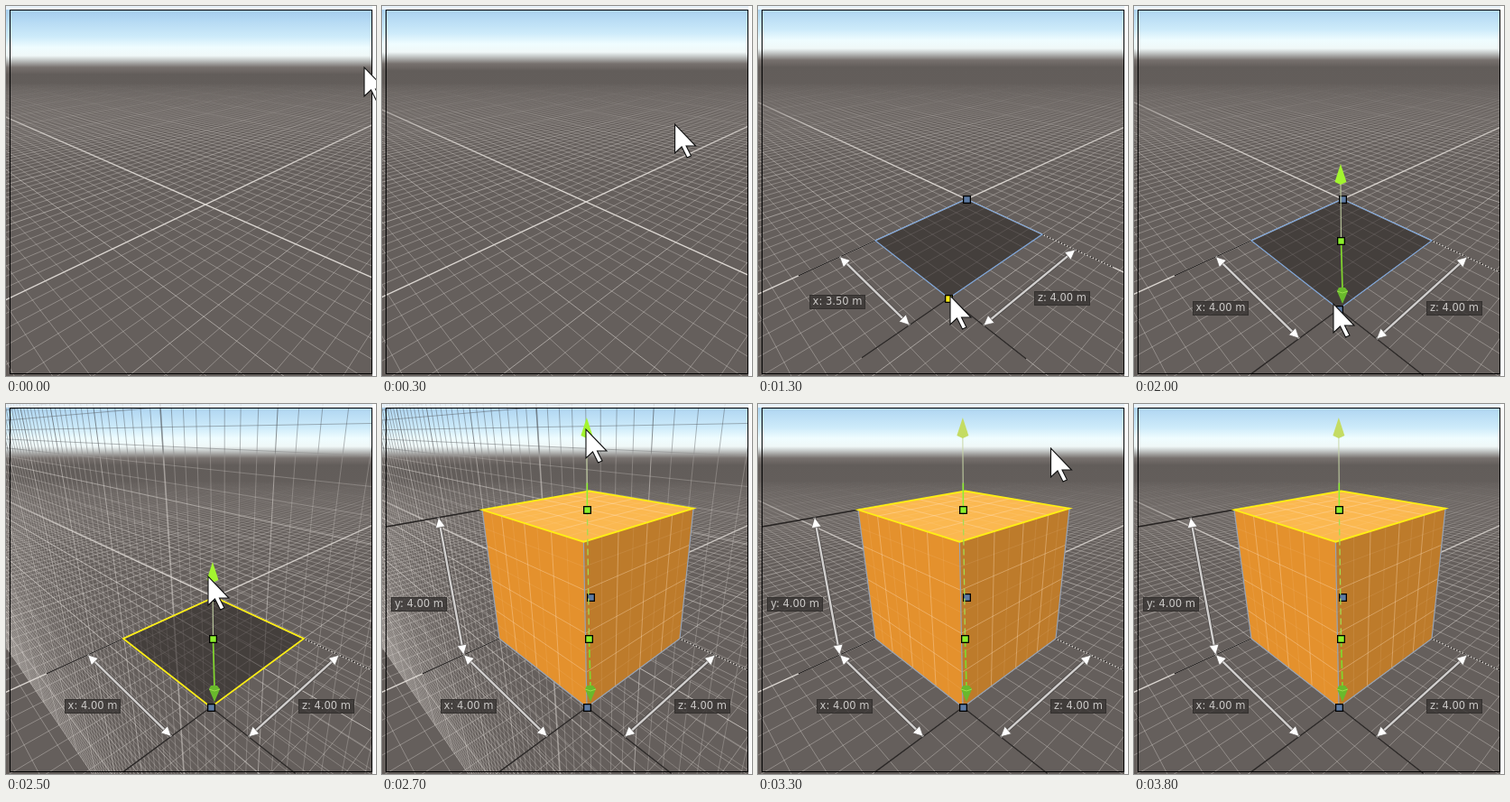
Animation, 410 px wide and 410 px high, one loop 3.9 s. Source, as an HTML page with a canvas:

```html
<!DOCTYPE html>
<html lang="en">
<head>
<meta charset="utf-8">
<title>Drawing a cube in a scene view</title>
<style>
html, body { margin: 0; width: 100%; height: 100%; overflow: hidden; background: #655f5c; }
canvas { display: block; }
</style>
</head>
<body>
<canvas id="stage" width="410" height="410"></canvas>
<script>
const ctx = document.getElementById('stage').getContext('2d');
const LOOP = 3900, STEP = 100, CELL = 0.5, SIZE = 4, GAP = 1.17;
const YELLOW = '#ffee14', GREEN = '#8cf02c', BLUE = '#5e7ba3';

// Projection columns (origin, x, y, z), axes scaled to 4 metres
const camStart = [[221, 220, 1], [37.2, -7.8, -.1956], [-28.3, -128.8, -.117], [-127.3, -6.6, -.207]];
const camEnd = [[231, 214, 1], [32.52, -6.37, -.2014], [-28.3, -128.8, -.117], [-126.13, -4.26, -.1933]];
let cam = camEnd;

// Pointer path: time, x, y
const path = [[0, 397, 68], [700, 228, 215], [1000, 228, 215], [1300, 213, 321], [1400, 213, 321],
  [1600, 227, 336], [2000, 221, 330], [2400, 224, 191], [2500, 224, 191], [2700, 226, 28],
  [2800, 226, 28], [2900, 237, 22], [3000, 237, 22], [3600, 412, 76], [LOOP, 412, 76]];

const lerp = (a, b, p) => a + (b - a) * p;

function pointer(t) {
  const i = Math.max(1, path.findIndex(k => k[0] >= t));
  const [a, b] = [path[i - 1], path[i]];
  const p = (t - a[0]) / (b[0] - a[0]);
  return [lerp(a[1], b[1], p), lerp(a[2], b[2], p)];
}

function project(x, y, z) {
  const [sx, sy, w] = [0, 1, 2].map(i =>
    cam[0][i] + (cam[1][i] * x + cam[2][i] * y + cam[3][i] * z) / SIZE);
  return [sx / w, sy / w];
}

function trace(points, close) {
  ctx.beginPath();
  points.forEach(p => ctx.lineTo(...p));
  if (close) ctx.closePath();
}

function line(points, color, width = 1, dash = []) {
  trace(points);
  ctx.setLineDash(dash);
  ctx.strokeStyle = color;
  ctx.lineWidth = width;
  ctx.stroke();
  ctx.setLineDash([]);
}

function shape(points, fill, stroke, width = 1) {
  trace(points, true);
  ctx.fillStyle = fill;
  ctx.fill();
  if (!stroke) return;
  ctx.strokeStyle = stroke;
  ctx.lineWidth = width;
  ctx.stroke();
}

function fade(stops, top = 0) {
  const g = ctx.createLinearGradient(0, top, 0, top + 410);
  stops.forEach(([y, c]) => g.addColorStop(y / 410, c));
  return g;
}

const white = a => `rgba(225,220,215,${a})`;

function backdrop(shift) {
  ctx.fillStyle = fade([[0, '#a9d0ee'], [8, '#b4d9f3'], [26, '#cdebfa'], [38, '#effdff'], [47, '#f0f8f8'],
    [52, '#c3c7c6'], [60, '#77716e'], [68, '#625d5a'], [110, '#655f5c'], [400, '#655f5c']], shift);
  ctx.fillRect(0, 0, 410, 410);
}

// Farthest visible coordinate along an axis before reaching the camera
function nearLimit(axis, other, value) {
  const w = 1 + cam[other][2] * value / SIZE;
  return (w - .2) / -cam[axis][2] * SIZE;
}

function ground() {
  const minor = fade([[0, white(0)], [85, white(0)], [110, white(.1)], [145, white(.27)],
    [200, white(.33)], [410, white(.36)]]);
  const major = fade([[0, white(0)], [85, white(0)], [130, white(.3)], [200, white(.5)], [410, white(.55)]]);
  const axis = fade([[0, white(0)], [85, white(.1)], [135, white(.75)], [200, white(.95)], [410, white(.95)]]);
  for (let i = -120; i <= 60; i++) {
    const c = i * CELL;
    const color = i === 0 ? axis : i % 8 ? minor : major;
    const width = i === 0 ? 1.4 : 1;
    line([project(c, 0, -60), project(c, 0, nearLimit(3, 1, c))], color, width);
    line([project(-60, 0, c), project(nearLimit(1, 3, c), 0, c)], color, width);
  }
}

function wall() {
  const tone = a => fade([[0, `rgba(70,75,80,${a + .15})`], [50, `rgba(90,92,94,${a + .15})`],
    [64, white(a)], [410, white(a)]]);
  const minor = tone(.27), major = tone(.5);
  for (let i = -80; i <= 18; i++) {
    const c = i * CELL, color = i % 8 ? minor : major;
    line([project(c, -20, 2), project(c, 9, 2)], color, i === 0 ? 1.6 : 1);
    if (i >= -40) line([project(-45, c, 2), project(8, c, 2)], color);
  }
}

function guides(w, d, h) {
  const ext = 2 * GAP, dark = '#272423';
  line([project(0, 0, d), project(0, 0, d + ext)], dark, 1.3);
  line([project(w, 0, 0), project(w + ext, 0, 0)], dark, 1.3, [2, 1.5]);
  line([project(w, 0, d), project(w + ext, 0, d)], dark, 1.3);
  line([project(w, 0, d), project(w, 0, d + ext)], dark, 1.3);
  if (h) line([project(0, h, d), project(0, h, d + ext)], dark, 1.5);
}

function head([x, y], angle) {
  ctx.save();
  ctx.translate(x, y);
  ctx.rotate(angle);
  shape([[0, 0], [-11, -5.5], [-11, 5.5]], '#fff', '#66615e', .7);
  ctx.restore();
}

function dimension(name, value, a, b, dx, dy) {
  const angle = Math.atan2(b[1] - a[1], b[0] - a[0]);
  line([a, b], '#4b4745', 4);
  line([a, b], '#d2d0cf', 2.4);
  head(a, angle + Math.PI);
  head(b, angle);
  const x = Math.round((a[0] + b[0]) / 2 + dx), y = Math.round((a[1] + b[1]) / 2 + dy);
  ctx.fillStyle = 'rgba(55,52,50,.8)';
  ctx.fillRect(x - 31, y - 8, 62, 16);
  ctx.strokeStyle = '#34312f';
  ctx.lineWidth = 1;
  ctx.strokeRect(x - 30.5, y - 7.5, 61, 15);
  ctx.font = '11.5px "DejaVu Sans", sans-serif';
  ctx.textAlign = 'center';
  ctx.textBaseline = 'middle';
  ctx.fillStyle = '#cbc9c7';
  ctx.fillText(`${name}: ${value.toFixed(2)} m`, x, y + .5);
}

function dimensions(w, d, h) {
  const zo = d + GAP, xo = w + GAP;
  dimension('x', w, project(0, 0, zo), project(w, 0, zo), -41, 12);
  dimension('z', d, project(xo, 0, 0), project(xo, 0, d), 36, 12);
  if (h) dimension('y', h, project(0, h, zo), project(0, 0, zo), -36, 20);
}

// at(u, v) gives a screen point; faces are ruled every half metre
function face(at, width, height, fill) {
  shape([at(0, 0), at(width, 0), at(width, height), at(0, height)], fill);
  const rule = i => `rgba(255,224,190,${i % 2 ? .1 : .36})`;
  for (let i = 1; i < width / CELL; i++) line([at(i * CELL, 0), at(i * CELL, height)], rule(i));
  for (let i = 1; i < height / CELL; i++) line([at(0, i * CELL), at(width, i * CELL)], rule(i));
}

function cube(w, d, h) {
  face((u, v) => project(u, v, d), w, h, '#e4912d');
  face((u, v) => project(w, v, u), d, h, '#bd7b2b');
  face((u, v) => project(u, h, v), w, d, '#fbb850');
  const edge = '#98a3b4';
  line([project(0, h, d), project(0, 0, d), project(w, 0, d), project(w, 0, 0), project(w, h, 0)], edge, 1.2);
  line([project(w, 0, d), project(w, h, d)], edge, 1.2);
}

const outline = (w, d, h) => [project(0, h, 0), project(w, h, 0), project(w, h, d), project(0, h, d)];

function handle([x, y], color) {
  const l = Math.round(x) - 4, t = Math.round(y) - 4;
  ctx.fillStyle = '#000';
  ctx.fillRect(l, t, 9, 9);
  ctx.fillStyle = color;
  ctx.fillRect(l + 1.3, t + 1.3, 6.4, 6.4);
}

function gizmo(h, pale) {
  const [bx, by] = project(2, 0, 2), [tx, ty] = project(2, h, 2);
  const tip = lerp(175, 15, h / SIZE), x = tx - .5;
  line([[x, tip + 20], [tx, ty]], '#c9d8a8', 1);
  if (h) {
    line([[tx, ty - 29], [tx, ty]], GREEN, 1.5);
    line([[tx, ty], [bx, by]], '#a5dc50', 1.3, [7, 4]);
  }
  line([[bx, by], [231, 314]], '#82d82e', 1.7, h ? [9, 3] : []);
  shape([[x, tip], [x + 6.5, tip + 20], [x, tip + 23], [x - 6.5, tip + 20]], pale ? '#c4dc63' : '#a3f52f');
  shape([[231, 330], [225, 316], [227, 312], [234, 312], [237, 316]], '#69b92c');
  line([[225, 316], [231, 318], [237, 316]], '#9add4c');
  handle([bx, by], GREEN);
  if (h) handle([tx, ty], GREEN);
}

function cursor([x, y]) {
  const arrow = [[0, 0], [0, 32], [7.5, 25], [13.5, 37], [18, 35], [12.5, 24], [23, 24]];
  shape(arrow.map(([dx, dy]) => [x + dx, y + dy]), '#fff', '#111', 1.1);
}

// Width, depth and height of the drawn box in metres
function extent(t) {
  if (t < 1100) return [0, 0, 0];
  if (t < 1200) return [1, 1.5, 0];
  if (t < 1300) return [2.5, 3, 0];
  if (t < 1500) return [3.5, 4, 0];
  return [4, 4, t < 2600 ? 0 : t < 2700 ? 2 : 4];
}

function render(t) {
  const p = Math.min(1, t / 600);
  cam = camStart.map((col, i) => col.map((v, j) => lerp(v, camEnd[i][j], p)));
  const [w, d, h] = extent(t);
  const hover = t >= 2400, dragging = t < 1600;

  backdrop(lerp(8, 0, p));
  ground();
  if (t >= 2400 && t < 2900) wall();
  if (w) {
    guides(w, d, h);
    if (h) cube(w, d, h);
    shape(outline(w, d, h), h ? 'transparent' : 'rgba(42,38,36,.55)',
      hover ? YELLOW : '#7ea5d8', hover ? 1.8 : 1.2);
    dimensions(w, d, h);
    handle(project(0, 0, 0), BLUE);
    handle(project(w, 0, d), dragging ? YELLOW : BLUE);
    if (t >= 1700) gizmo(h, t >= 3100);
  } else if (t >= 700) {
    handle(project(0, 0, 0), YELLOW);
  }

  ctx.fillStyle = '#fdfdfd';
  ctx.fillRect(406, 0, 4, 410);
  ctx.fillStyle = 'rgba(255,255,255,.75)';
  ctx.fillRect(0, 0, 410, 4);
  ctx.strokeStyle = '#000';
  ctx.lineWidth = 1;
  ctx.strokeRect(4.5, 4.5, 401, 403);
  if (t < 3600) cursor(pointer(t));
}

const start = performance.now();
function tick() {
  const t = (performance.now() - start) % LOOP;
  render(Math.floor(t / STEP) * STEP);
  requestAnimationFrame(tick);
}
tick();
</script>
</body>
</html>
```
